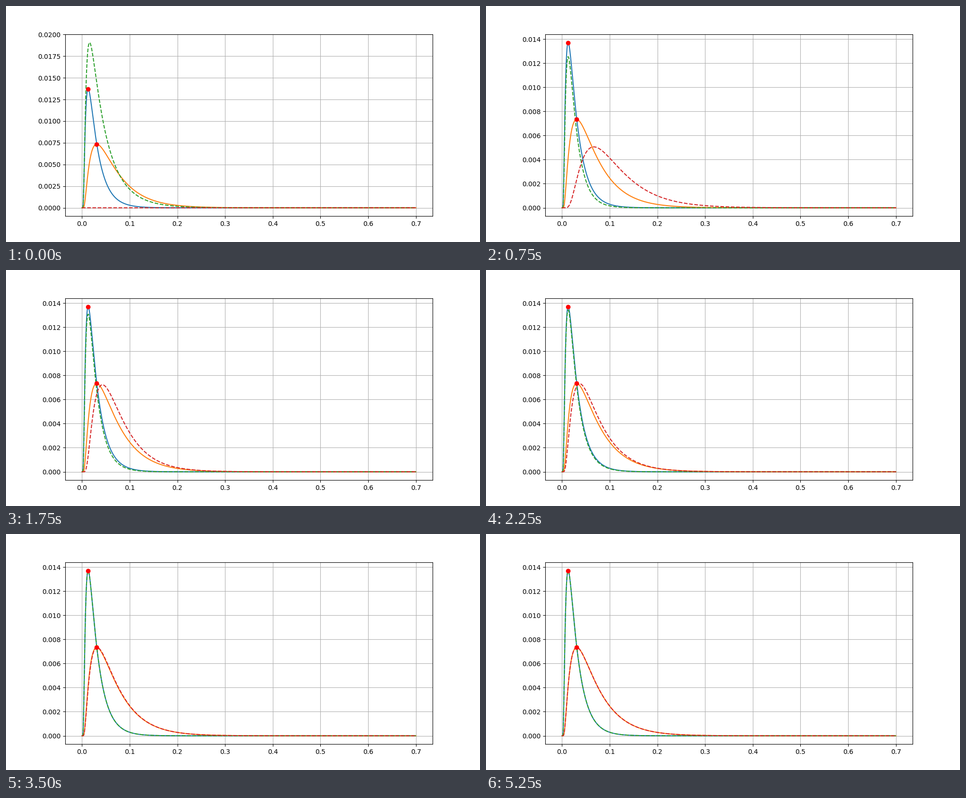
A matplotlib script that plays this animation: 1000 px wide and 500 px high, repeating every 5500 ms.

```python
import numpy as np
import matplotlib.pyplot as plt
from matplotlib.animation import FuncAnimation

STEP = 250
FRAMES = 22

t = np.linspace(1e-6, 0.7, 2001)


def pulse(peak, height, decay, skew):
    """Single hump: sharp rise to `peak`, then a near-exponential tail."""
    x = t / peak
    bend = skew * (1 / x - 1 + np.log(x))
    return height * np.exp(-decay * (t - peak) ** 2 / t - bend)


# Peak time, peak height, decay rate and skew of the two solid curves.
FAST = (0.0130, 0.01372, 40.0, 0.7)
SLOW = (0.0310, 0.00734, 22.9, 0.0)


def fit_fast(s):
    """A tall first guess collapses at once, then creeps up to FAST."""
    peak, height, decay, skew = FAST
    guess = np.exp(-12 * s)
    gap = np.exp(-(s / 2) ** 3)
    return pulse(peak + 0.003 * guess,
                 height * (1 - 0.09 * gap + 0.48 * guess),
                 decay * (1 + 0.18 * gap - 0.65 * guess), skew)


def fit_slow(s):
    """Grows from a flat line and slides left onto SLOW."""
    peak, height, decay, skew = SLOW
    gap = np.exp(-0.66 * s ** 1.5)
    return pulse(peak + 0.055 * gap,
                 height * (1 - np.exp(-1.8 * s ** 1.5)),
                 decay * (1 + 0.66 * gap - 1.48 * gap ** 2), skew)


fig, ax = plt.subplots(figsize=(10, 5), dpi=100)
ax.grid(True)
ax.set_xlim(-0.035, 0.735)

for target in (FAST, SLOW):
    ax.plot(t, pulse(*target))
dashes = [ax.plot(t, 0 * t, "--")[0] for _ in range(2)]
for peak, height, *_ in (FAST, SLOW):
    ax.plot(peak, height, "ro")


def update(i):
    s = i * STEP / 1000
    top = FAST[1]
    for line, fit in zip(dashes, (fit_fast, fit_slow)):
        y = fit(s)
        line.set_ydata(y)
        top = max(top, y.max())
    ax.set_ylim(-0.05 * top, 1.05 * top)
    return dashes


anim = FuncAnimation(fig, update, frames=FRAMES, interval=STEP,
                     init_func=lambda: update(0), repeat=True, repeat_delay=0)
plt.show()
```
